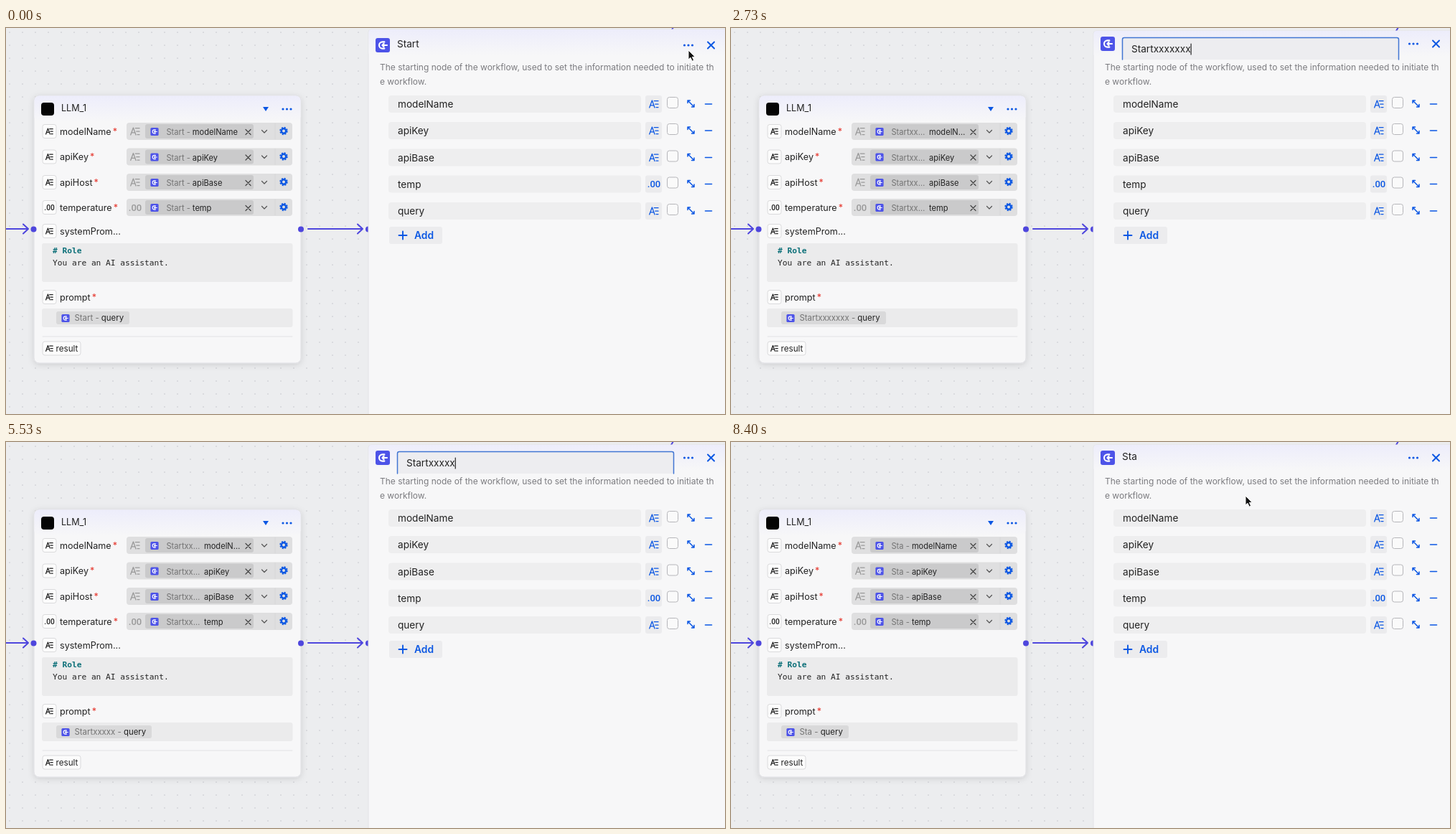
Recreate the animation shown at these times as an HTML page. Size 1002x538 px, loop 8.47 s.

```html
<!DOCTYPE html>
<html lang="en">
<head>
<meta charset="utf-8">
<style>
html, body { margin: 0; width: 100%; height: 100%; overflow: hidden; background: #ecedef; }
body { position: relative; font: 11.1px/18px Inter, sans-serif; }
svg { position: absolute; left: 0; top: 0; font-family: Inter, sans-serif; fill: #222; }
.line { fill: none; stroke-linecap: round; stroke-linejoin: round; }
.mono { font: 11.2px "DejaVu Sans Mono", monospace; }
.heading { fill: #0b6f78; font-weight: bold; }
.chip { position: absolute; display: flex; white-space: pre; color: #222; }
.chip span { overflow: hidden; text-overflow: ellipsis; min-width: 0; }
.chip .node { color: #737373; }
.fixed { left: 223.5px; width: 105px; }
.fixed .node { max-width: 52.5px; }
.free { left: 70px; top: 395px; padding: 0 8px 0 25.5px; background: #d9d9da; border-radius: 3px; font-size: 11.4px; }
</style>
</head>
<body>
<svg id="stage" width="1002" height="538" viewBox="0 0 1002 538"></svg>
<script>
const BLUE = '#0b57e3', VIOLET = '#4e46dd', LOOP = 8470;
const $ = id => document.getElementById(id);

const box = (x, y, w, h, fill, r = 3, more = '') =>
  `<rect x="${x}" y="${y}" width="${w}" height="${h}" rx="${r}" fill="${fill}" ${more}/>`;
const text = (x, y, s, size, more = '') => `<text x="${x}" y="${y}" font-size="${size}" ${more}>${s}</text>`;
const line = (d, color, w = 1.5, more = '') =>
  `<path class="line" d="${d}" stroke="${color}" stroke-width="${w}" ${more}/>`;
const at = (x, y, s, scale = 1) => `<g transform="translate(${x} ${y}) scale(${scale})">${s}</g>`;
const dot = (x, y, r, fill) => `<circle cx="${x}" cy="${y}" r="${r}" fill="${fill}"/>`;
const dots = (x, y) => [-5.5, 0, 5.5].map(d => dot(x + d, y, 1.6, BLUE)).join('');

const typeIcon = (x, y, kind, color, scale = 1) => kind === 'num'
  ? text(x, y + 4.5 * scale, '.00', 13 * scale, `fill="${color}" text-anchor="middle" font-weight="500" style="font-family:Roboto,sans-serif"`)
  : at(x, y, line('M-6.3 5L-2.6-5L1 5M-5 1.8H-.2M.3-4.3H6M1.8 .2H6M3 4.6H6', color, 1.3 / scale), scale);
const badge = (y, kind, w = 19) => box(51, y - 9.5, w, 19, '#fcfcfc', 3, 'stroke="#dadadc"')
  + typeIcon(60.5, y, kind, '#222', .78);
const startIcon = (x, y, scale) => at(x, y, box(-10, -10, 20, 20, '#4d53e8', 3)
  + line('M2.4-4.6H-.4A4.6 4.6 0 0 0-.4 4.6H2.4M6 0H-.6M1.6-2.2L-.6 0L1.6 2.2', '#fff', 2.1), scale);
const arrow = (x1, x2) => line(`M${x1} 280H${x2}M${x2 - 7} 273.5L${x2} 280L${x2 - 7} 286.5`, VIOLET, 2);
const gear = (x, y) => at(x, y, `<circle r="3.2" fill="none" stroke="${BLUE}" stroke-width="2.4"/>
  <circle r="4.8" fill="none" stroke="${BLUE}" stroke-width="1.8" stroke-dasharray="2.2 1.57"/>`);
const label = (y, s, required = true) => text(75, y + 4.5, s
  + (required ? '<tspan fill="#e5342b" dx="2">*</tspan>' : ''), 12.6);

const inputRow = ([name, , y, kind]) => badge(y, kind) + label(y, name)
  + box(168, y - 12, 231, 24, '#dfdfe0', 4) + box(194, y - 10, 151, 20, '#cacacb')
  + typeIcon(180, y, kind, '#999', 1) + startIcon(207, y + .5, .56)
  + line(`M334 ${y - 2.5}l7 7m0-7l-7 7`, '#444', 1.2)
  + line(`M356.5 ${y - 1.5}l3.5 3.5l3.5-3.5`, '#555', 1.2)
  + line(`M375 ${y - 11}v22`, '#d6d6d8', 1) + gear(387, y - .5);

const paramRow = ([name, y, kind]) => box(533, y - 12, 352, 24, '#eeeeef', 4)
  + text(546, y + 5, name, 13.6) + box(891, y - 12, 23, 24, '#ebebed')
  + typeIcon(903, y, kind, BLUE) + box(921.5, y - 9.5, 15, 15, '#fafafa', 3, 'stroke="#b6b6ba"')
  + line(`M950 ${y - 1.5}v-3.5h3.5m-3.5 0l9 9m0-3.5v3.5h-3.5M950 ${y - 5}l3 3`, BLUE, 1.5)
  + line(`M974.5 ${y}h9`, BLUE, 1.6);

const inputs = [['modelName', 'modelName', 144], ['apiKey', 'apiKey', 179.5],
  ['apiHost', 'apiBase', 215], ['temperature', 'temp', 250, 'num']];
const params = [['modelName', 106], ['apiKey', 143], ['apiBase', 180.5], ['temp', 217.5, 'num'], ['query', 255]];

const moveShape = 'M-6 0H6M0-6V6M-4-2L-6 0L-4 2M4-2L6 0L4 2M-2-4L0-6L2-4M-2 4L0 6L2 4';
const cursors = {
  arrow: '<path d="M0 0V13L3 10.3L5.2 15.2L7.6 14.1L5.4 9.4H9.3Z" fill="#111" stroke="#fff"/>',
  hand: '<path transform="scale(1.15)" d="M-2-5.5Q-.8-7.5 .3-5.5V-1Q2-2 3-.5Q4.5-1.3 5.2 .2Q7 0 7 2V5Q7 7 5.5 9H-1.5L-5.5 3.5Q-6.3 1.6-4.5 1.6L-2 3.5Z" fill="#fff" stroke="#222" stroke-width="1.2"/>',
  move: line(moveShape, '#fff', 3.6) + line(moveShape, '#222', 1.5),
  beam: line('M-3-7.5Q0-7 0-5V5Q0 7-3 7.5M3-7.5Q0-7 0-5M0 5Q0 7 3 7.5M-2 2H2', '#222', 1.3),
  none: ''
};

$('stage').innerHTML = `<defs>
  <pattern id="grid" width="18" height="18" patternUnits="userSpaceOnUse">${dot(5, 6, .85, '#c8c9ce')}</pattern>
  <linearGradient id="head" x2="0" y2="1"><stop stop-color="#ededfb"/><stop offset="1" stop-color="#f7f7f8"/></linearGradient>
  <filter id="shade" x="-20%" y="-20%" width="140%" height="140%"><feDropShadow dx="0" dy="2" stdDeviation="4" flood-opacity=".13"/></filter>
  </defs>`
  + box(0, 0, 1002, 538, '#ecedef', 0) + box(0, 0, 1002, 538, 'url(#grid)', 0)
  + arrow(-5, 31) + arrow(421, 497) + dot(505, 280.5, 4, VIOLET)
  // node card
  + box(39, 94, 372, 373, '#f7f7f8', 7, 'stroke="#dddde2" filter="url(#shade)"')
  + box(39.5, 94.5, 371, 36, 'url(#head)', 7)
  + dot(38.5, 280.5, 4, VIOLET) + dot(411, 280.5, 4, VIOLET)
  + box(49, 104, 18, 18, '#050505', 4) + text(77, 116, 'LLM_1', 12.6)
  + `<path d="M358 110H366L362 116Z" fill="${BLUE}"/>` + dots(391.5, 113)
  + inputs.map(inputRow).join('')
  + badge(283) + label(283, 'systemProm...', false)
  + box(50, 300, 349.5, 54, '#ebebec')
  + '<text class="mono heading" x="65" y="314"># Role</text>'
  + '<text class="mono" x="65" y="330.5">You are an AI assistant.</text>'
  + badge(375) + label(375, 'prompt') + box(50, 391, 349.5, 26, '#ebebec')
  + line('M51 430H399', '#e2e2e4', 1) + badge(446.5, '', 53) + text(69.5, 451, 'result', 11.7)
  // settings panel
  + line('M930-1L927 4', VIOLET, 2)
  + `<g id="sheet">${box(505, 0, 500, 545, '#f7f7f8', 4, 'stroke="#e2e2e6"') + box(505.5, 0, 500, 36, 'url(#head)', 4)}</g>`
  + `<g id="header">${startIcon(525, 22, 1) + dots(951, 22) + line('M978 17.5l9 9m0-9l-9 9', BLUE, 2)}</g>`
  + text(545, 25, '', 13.6, 'id="title"')
  + `<g id="field">${box(546, 14, 384, 30, '#ededf0', 0)
    + line('M545.5 44V16Q545.5 13.5 548 13.5H928Q930.5 13.5 930.5 16V44', '#4176d3', 1.5)
    + text(558, 34, '', 13.6, 'id="typed"')
    + line('', '#222', 1.2, 'id="caret"') + line('', '#e0483e', 1.6, 'id="squiggle" stroke-dasharray=".1 3"')}</g>`
  + text(521, 59, 'The starting node of the workflow, used to set the information needed to initiate th', 12, 'fill="#7b7b7f"')
  + text(521, 79, 'e workflow.', 12, 'fill="#7b7b7f"')
  + params.map(paramRow).join('')
  + box(534, 277, 74, 24, '#ececee') + line('M547.5 289h11m-5.5-5.5v11', BLUE, 1.9)
  + text(569, 294, 'Add', 13.8, `fill="${BLUE}" font-weight="600"`)
  + `<g id="menu">${box(851.5, 38.5, 111.5, 115.5, '#fafafa', 6, 'filter="url(#shade)"')
    + box(852, 42, 111, 37, '#f0f0f1', 0, 'id="hover"') + text(867, 65, 'Edit Title', 13.8)
    + ['Create Copy', 'Delete'].map((s, i) => text(867, 101.5 + 36 * i, s, 13.8, 'fill="#b5b5b8"')).join('')}</g>`
  + '<g id="cursor"></g>';

const addChip = (value, kind, top = '') => document.body.insertAdjacentHTML('beforeend',
  `<div class="chip ${kind}" style="${top}"><span class="node"></span><span>${value}</span></div>`);
inputs.forEach(([, value, y]) => addChip(value, 'fixed', `top:${y - 8}px`));
addChip('query', 'free');
document.body.insertAdjacentHTML('beforeend', `<svg width="100" height="420">${startIcon(83, 404.5, .56)}</svg>`);
const nodes = document.querySelectorAll('.node');

// Cursor stops: time, x, y, shape
const path = [[0, 951, 31, 'arrow'], [150, 950, 26, 'hand'], [450, 950, 26, 'hand'], [750, 890, 62, 'hand'],
  [900, 886, 63, 'hand'], [1000, 845, 64, 'hand'], [1060, 815, 58, 'beam'], [1250, 720, 38, 'beam'],
  [1420, 720, 38, 'none'], [2800, 720, 38, 'beam'], [2950, 760, 80, 'arrow'], [3350, 951, 28, 'move'],
  [3680, 951, 28, 'hand'], [3980, 892, 61, 'hand'], [4260, 888, 61, 'hand'], [4340, 840, 55, 'beam'],
  [4600, 711, 36, 'beam'], [4900, 711, 36, 'none'], [7400, 711, 36, 'beam'], [7750, 717, 60, 'arrow'],
  [8150, 717, 75, 'arrow'], [LOOP, 717, 75, 'arrow']];
const typing = [1430, 1600, 1850, 2040, 2240, 2450, 2700];
const erasing = [5300, 5465, 5630, 5795, 5960, 6160, 6310, 6460, 6800];
const within = (t, ...spans) => spans.some(([a, b]) => t >= a && t < b);
const show = (id, on) => $(id).setAttribute('visibility', on ? 'inherit' : 'hidden');

function draw(t) {
  const past = list => list.filter(k => t >= k).length;
  const name = 'Startxxxxxxx'.slice(0, 5 + past(typing) - past(erasing));
  nodes.forEach(n => { n.textContent = name + ' - '; });

  const editing = within(t, [930, 2960], [4250, 7880]);
  const low = t < 930 ? 2 : 0;
  $('sheet').setAttribute('transform', `translate(0 ${4 - low})`);
  $('header').setAttribute('transform', `translate(0 ${low})`);
  $('title').setAttribute('y', 25 + low);
  $('title').textContent = $('typed').textContent = name;
  show('title', !editing);
  show('field', editing);
  const end = 558.5 + $('typed').getComputedTextLength();
  $('caret').setAttribute('d', `M${end} 22V37`);
  $('squiggle').setAttribute('d', `M559 36.5H${end - 1}`);
  show('squiggle', editing && within(t, [4250, erasing[0]]));

  const i = path.findIndex((p, k) => t < path[k + 1][0]);
  const [t0, x0, y0, shape] = path[i], [t1, x1, y1] = path[i + 1];
  const u = (t - t0) / (t1 - t0), e = u * u * (3 - 2 * u);
  const x = x0 + (x1 - x0) * e, y = y0 + (y1 - y0) * e;
  $('cursor').innerHTML = at(x, y, cursors[shape]);
  // Hidden menu keeps its hover row hidden too
  show('menu', within(t, [350, 1080], [3450, 4330]));
  show('hover', within(t, [620, 1080], [3800, 4330]));
}

function tick(now) {
  draw(now % LOOP);
  requestAnimationFrame(tick);
}
requestAnimationFrame(tick);
</script>
</body>
</html>
```
